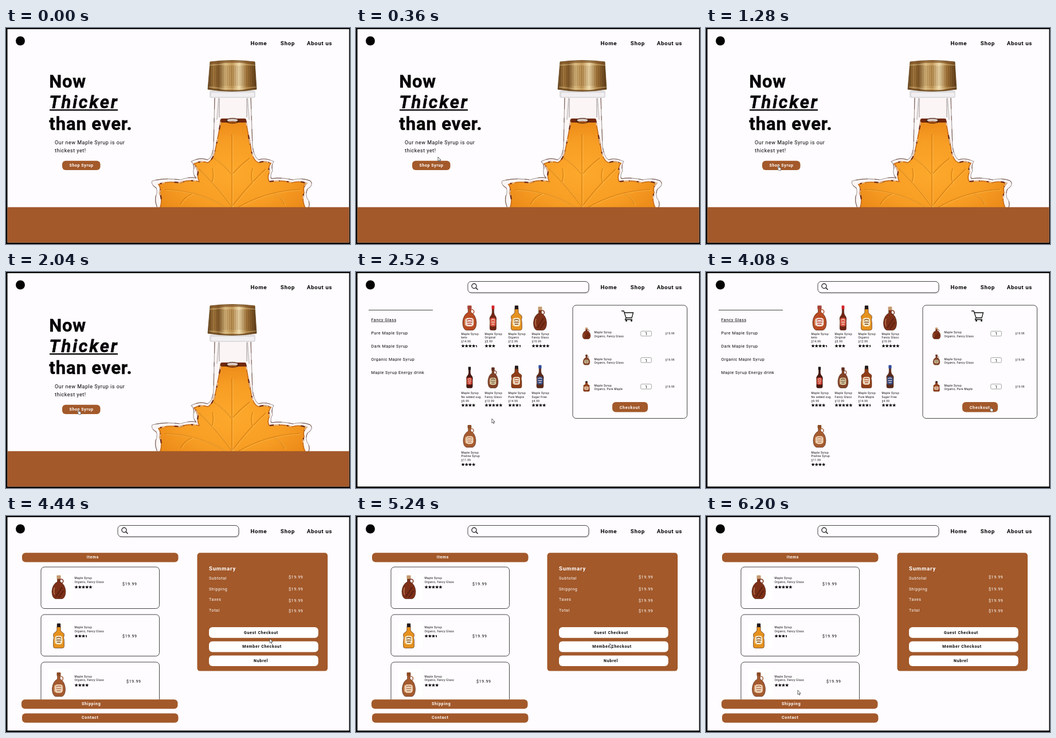
Animation, 600 px wide and 377 px high, one loop 6.24 s. Source, as an HTML page:

```html
<!DOCTYPE html>
<html lang="en">
<head>
<meta charset="utf-8">
<title>Maple syrup shop</title>
<style>
html, body { margin: 0; width: 100%; height: 100%; overflow: hidden; background: #000; }
svg { display: block; width: 600px; height: 377px; font-family: Roboto, Arial, sans-serif; }
text { white-space: pre; }
</style>
</head>
<body>
<svg id="stage" viewBox="0 0 600 377"></svg>
<script>
const BROWN = '#a3592a', INK = '#050405', PAPER = '#fefcfe';
const LOOP = 6240, TO_SHOP = 2200, TO_CHECKOUT = 4160;

const text = (x, y, str, size, { bold, spacing = 0, fill = INK, anchor = 'start', extra = '' } = {}) =>
  `<text x="${x}" y="${y}" font-size="${size}" font-weight="${bold ? 700 : 400}" letter-spacing="${spacing}" fill="${fill}" text-anchor="${anchor}" ${extra}>${str}</text>`;
const box = (x, y, w, h, r, fill, extra = '') =>
  `<rect x="${x}" y="${y}" width="${w}" height="${h}" rx="${r}" fill="${fill}" ${extra}/>`;
const path = (d, fill = 'none', stroke = 'none', width = 1, extra = '') =>
  `<path d="${d}" fill="${fill}" stroke="${stroke}" stroke-width="${width}" ${extra}/>`;
const oval = (cx, cy, rx, ry, fill) => `<ellipse cx="${cx}" cy="${cy}" rx="${rx}" ry="${ry}" fill="${fill}"/>`;
const group = (content, attrs = '') => `<g ${attrs}>${content}</g>`;
const frame = (x, y, w, h, r) => box(x, y, w, h, r, PAPER, 'stroke="#333" stroke-width=".9"');
const small = (x, y, str) => text(x, y, str, 4.8, { spacing: .36 });
const label = (x, y, str, fill = '#fff') => text(x, y, str, 7, { bold: true, spacing: .7, fill });

function starPath(cx, cy, r) {
  const points = Array.from({ length: 10 }, (_, i) => {
    const a = i * Math.PI / 5 - Math.PI / 2, d = i % 2 ? r * .42 : r;
    return `${(cx + d * Math.cos(a)).toFixed(2)} ${(cy + d * Math.sin(a)).toFixed(2)}`;
  });
  return `M${points.join('L')}Z`;
}

function stars(x, y, rating) {
  let out = '';
  for (let i = 0; i < Math.ceil(rating); i++) {
    const half = rating - i < 1;
    out += path(starPath(x + 3.1 + i * 6.2, y, 3.3), half ? 'url(#half)' : INK);
  }
  return out;
}

const SHAPES = {
  slim: 'M8 5H12V11Q12 15 16 18Q18 20 17 25V37Q17 40 14 40H6Q3 40 3 37V25Q2 20 4 18Q8 15 8 11Z',
  wide: 'M7 5H13V11Q14 14 18 16Q20 18 18 23Q19 26 19 29V37Q19 40 16 40H4Q1 40 1 37V29Q1 26 2 23Q0 18 2 16Q6 14 7 11Z',
  round: 'M8 5H12V11Q19 15 20 27Q20 38 15 40H5Q0 38 0 27Q1 15 8 11Z'
};
const KINDS = {
  keto: ['round', '#b84b22', '#a6423a', '#efe0d2', '#c23a34'],
  red: ['slim', '#6f2413', '#d3232b', '#d8503f', '#f2dcc5'],
  gold: ['wide', '#e5921f', '#22191a', '#f6e7c5', '#7a4b24'],
  jug: ['round', '#7c3018', '#c59a70', '', ''],
  dark: ['slim', '#451712', '#1f1616', '#c83b2d', '#f3ddcc'],
  cabin: ['round', '#814126', '#5d2b1d', '#dac9a0', '#70563e'],
  amber: ['wide', '#8e3d17', '#241c1c', '#eddfc4', '#b04b2d'],
  blue: ['slim', '#5a2818', '#2d4c9b', '#31477e', '#dccbd0'],
  praline: ['round', '#a55b2f', '#8b4c26', '#f0d5b7', '#b77b59']
};

function bottle(x, y, w, h, kind) {
  const [shape, body, cap, paper, print] = KINDS[kind];
  let art = path(SHAPES[shape], body, '#4b2115', .6) + box(7, 0, 6, 6, 1, cap);
  if (shape === 'round') art += `<ellipse cx="13.5" cy="10" rx="3" ry="3.4" fill="none" stroke="${body}" stroke-width="1.3"/>`;
  art += path('M4 33Q2 27 4 21', 'none', '#ffd2a0', 1, 'opacity=".55"');
  if (paper) {
    art += box(4, 20, 12, 14, 4, paper) + path('M6 24Q10 21 14 24M6 27H14M7 30.5H13', 'none', print, 1.4);
  } else {
    art += path('M6 36L15 20M10 38L17 26', 'none', '#4c180d', 2, 'opacity=".6"');
  }
  return group(art, `transform="translate(${x} ${y}) scale(${w / 20} ${h / 40})"`);
}

function heroLeaf() {
  const glass = 'M364 121L362 207Q360 227 351 230Q338 225 323 233Q330 240 327 248Q326 257 332 262Q321 259 304 265Q276 261 255 267Q252 273 262 279Q265 287 261 294Q259 304 265 316H527Q532 305 525 297Q522 288 526 281Q537 274 531 267Q518 261 500 265Q480 260 463 263Q460 257 465 249Q462 240 467 233Q452 226 441 230Q433 226 430 207L427 121Z';
  const syrup = 'M375 160H418Q422 185 427 208Q430 232 441 235Q451 231 462 236Q456 244 460 251Q455 260 459 268Q481 265 499 270Q512 266 524 271Q517 279 520 287Q515 300 523 316H268Q274 300 268 288Q271 279 266 273Q279 267 303 270Q319 264 337 268Q333 260 335 251Q333 243 328 237Q340 231 352 235Q362 230 366 208Q371 185 375 160Z';
  const veins = 'M394 185V313M394 312Q368 276 337 246M394 312Q421 276 453 246M394 256Q381 239 363 227M394 256Q409 239 425 227M359 270Q363 258 360 245M430 270Q426 258 430 245M384 313Q335 284 277 282M405 313Q455 284 513 282M326 289Q311 294 304 308M467 289Q480 294 486 308';
  const rim = (color, width, dash, offset) => path(syrup, 'none', color, width, `stroke-dasharray="${dash}" stroke-dashoffset="${offset}"`);
  const art = path(glass, '#fbf6f5', '#a5999a', 1.1) + path(syrup, 'url(#syrup)', '#c66a18', 1.6) +
    rim('#6d2c1c', 2.2, '17 13 6 19', 40) + rim('#ffd39b', 1.6, '5 24 9 17', 7) +
    path(veins, 'none', '#d17c10', 1.8, 'opacity=".65"') +
    path(veins, 'none', '#ffc65f', 1, 'transform="translate(1.8 1)" opacity=".6"') +
    path(glass, 'none', '#6b4940', 1, 'stroke-dasharray="21 15 8 12" opacity=".8"');
  return group(art, 'clip-path="url(#aboveBar)"');
}

function heroBottle() {
  let out = heroLeaf();
  out += path('M371 122L368 160M421 122L424 160', 'none', '#cfcacb', 2) + path('M372 123V156M420 123V156', 'none', '#80797a', .8);
  out += box(374, 158, 45, 7, 3, '#70280d') + oval(395, 162, 12, 5, '#512413') + oval(395, 161, 9.5, 2.8, '#d9cdc6') + oval(395, 164.5, 8, 1.8, '#9b4d14');
  out += box(355, 109, 80, 13, 3, '#dedcde') + box(358, 113, 75, 7, 2, '#f1eff1');
  out += path('M356 59Q395 54 434 59L437 107Q395 114 352 107Z', 'url(#metal)', '#65451d', .8);
  let ridges = '';
  for (let x = 357; x < 435; x += 3.3) ridges += `M${x.toFixed(1)} 66V101`;
  out += path(ridges, 'none', '#57340f', 1, 'opacity=".38"');
  out += path('M357 61Q395 56 433 61', 'none', '#805427', 4, 'opacity=".7"');
  return out + path('M355 65Q395 61 435 65M354 103Q395 109 436 103', 'none', '#ecd197', 1.2, 'opacity=".65"') +
    path('M353 106Q395 113 436 106', 'none', '#6b451c', 2, 'opacity=".8"');
}

function nav() {
  const item = (x, str) => text(x, 29.5, str, 9.8, { bold: true, spacing: .6 });
  return `<circle cx="25" cy="22.5" r="8" fill="${INK}"/>` + item(426.5, 'Home') + item(478.8, 'Shop') + item(524.8, 'About us');
}

const search = () =>
  box(196, 18, 211, 20, 6, '#d9d7d9') + frame(195, 16.5, 211, 19.5, 6) +
  '<circle cx="206" cy="24.5" r="4.1" fill="none" stroke="#111" stroke-width="1.2"/>' + path('M209 27.5L212.5 31', 'none', '#111', 1.4);

function landing() {
  const head = (y, str, spacing, extra = '') =>
    text(75.3, y, str, 31, { bold: true, spacing, extra: `stroke="${INK}" stroke-width=".45" ${extra}` });
  const copy = (y, str) => text(85, y, str, 9, { spacing: .5 });
  return heroBottle() + box(2.5, 312.7, 596, 61.8, 0, BROWN) +
    head(103.5, 'Now', .8) + head(140, 'Thicker', 2.7, 'font-style="italic"') + box(76, 142, 119, 2.3, 0, INK) + head(177.7, 'than ever.', .9) +
    copy(203.3, 'Our new Maple Syrup is our') + copy(217, 'thickest yet!') +
    box(98, 231.7, 66.5, 16.3, 6, BROWN) + text(110.5, 242.1, 'Shop Syrup', 7, { bold: true, spacing: .6, fill: '#fff' });
}

function shop() {
  const categories = ['Fancy Glass', 'Pure Maple Syrup', 'Dark Maple Syrup', 'Organic Maple Syrup', 'Maple Syrup Energy drink'];
  let out = search() + path('M22 66.5H134', 'none', '#333', .9) + path('M26.5 87H70', 'none', '#222', .7);
  categories.forEach((name, i) => out += text(26.5, 85.5 + 23 * i, name, 7.2, { spacing: .5 }));

  const products = [
    ['keto', '$14.99', 4.5, 'keto', 24, 43], ['Original', '$5.99', 3, 'red', 16, 43],
    ['Organic', '$12.99', 3.5, 'gold', 21, 43], ['Fancy Glass', '$19.99', 5, 'jug', 23, 41],
    ['No added sug.', '$9.99', 4, 'dark', 15, 37], ['Fancy Glass', '$13.99', 5, 'cabin', 18, 36],
    ['Pure Maple', '$14.99', 3.5, 'amber', 20, 39], ['Sugar Free', '$4.99', 4, 'blue', 17, 40],
    ['Praline Syrup', '$11.99', 4, 'praline', 22, 39]
  ];
  products.forEach(([name, price, rating, kind, w, h], i) => {
    const x = 183.5 + 41 * (i % 4), y = 103.5 * Math.floor(i / 4);
    out += bottle(x + 14.5 - w / 2, y + (i < 4 ? 101.5 : 99) - h, w, h, kind);
    out += small(x, y + 109.5, 'Maple Syrup') + small(x, y + 116.3, name) + small(x, y + 123, price) + stars(x, y + 129, rating);
  });

  out += frame(378, 58, 199.5, 197.5, 6);
  out += path('M463 68H467L471 80H481L483.5 71H468M471 80L469.5 83H482', 'none', '#111', 1.3) + oval(471.5, 85, 1.5, 1.5, '#111') + oval(480.5, 85, 1.5, 1.5, '#111');
  [['Fancy Glass', 'jug', 14, 20], ['Fancy Glass', 'cabin', 12, 18], ['Pure Maple', 'amber', 12, 18]].forEach(([name, kind, w, h], i) => {
    const y = 46.2 * i;
    out += bottle(402 - w / 2, y + 107 - h / 2, w, h, kind);
    out += small(415.5, y + 107.3, 'Maple Syrup') + small(415.5, y + 114, 'Organic, ' + name);
    out += box(496.8, y + 103.3, 18.5, 8.5, 1.5, '#fff', 'stroke="#999" stroke-width=".9"') + text(506, y + 110.3, '1', 7.5, { anchor: 'middle' });
    out += text(539.5, y + 109.2, '$19.99', 4.6, { spacing: .36 });
  });
  return out + box(447, 227, 62, 17.5, 6, BROWN) + label(459.8, 238.5, 'Checkout');
}

function checkout() {
  const bar = (x, y, tx, str) => box(x, y, 272.5, 16.3, 6, BROWN) + label(tx, y + 9.5, str);
  const light = (x, y, str) => text(x, y, str, 7.1, { spacing: .6, fill: '#fff' });
  let cards = '';
  [[203, 5, 'jug', 24, 41], [203, 3.5, 'gold', 21, 43], [210, 4, 'praline', 23, 42]].forEach(([px, rating, kind, w, h], i) => {
    const y = 89 + 83 * i, ty = 110.3 + 85.6 * i;
    cards += frame(61, y, 206.5, 72.5, 6) + box(73, y + 12, 43, 46, 0, '#fff') + bottle(92 - w / 2, y + 35 - h / 2 + i * 2, w, h, kind);
    cards += small(119.5, ty, 'Maple Syrup') + small(119.5, ty + 6.8, 'Organic, Fancy Glass') + stars(119.5, ty + 13.8, rating);
    cards += text(px, [121.3, 211.8, 290.6][i], '$19.99', 7, { spacing: .7 });
  });
  let out = search() + group(cards, 'clip-path="url(#listClip)"');
  out += bar(28, 64.3, 140.7, 'Items') + bar(27, 320.3, 132, 'Shipping') + bar(28, 344.5, 132, 'Contact');
  out += box(333.5, 64.3, 227.5, 206.3, 5, BROWN) + text(354, 94.5, 'Summary', 9.6, { bold: true, spacing: .8, fill: '#fff' });
  [['Subtotal', 111, 109], ['Shipping', 129.6, 129.5], ['Taxes', 148.3, 150], ['Total', 167, 167.5]].forEach(([name, y, py]) =>
    out += light(354, y, name) + light(493, py, '$19.99'));
  [[415, 'Guest Checkout'], [412.3, 'Member Checkout'], [432, 'Nubrel']].forEach(([x, str], i) => {
    const y = 194 + 24.7 * i;
    out += box(354, y, 190.7, 18.7, 6, '#fff') + label(x, y + 11.6, str, INK);
  });
  return out;
}

const defs = `<defs>
  <linearGradient id="half"><stop offset=".5" stop-color="${INK}"/><stop offset=".5" stop-color="${INK}" stop-opacity="0"/></linearGradient>
  <linearGradient id="metal"><stop offset="0" stop-color="#5f3f1c"/><stop offset=".12" stop-color="#a57a40"/><stop offset=".22" stop-color="#7d5628"/><stop offset=".36" stop-color="#d6b67c"/><stop offset=".5" stop-color="#b98e50"/><stop offset=".64" stop-color="#f1deb0"/><stop offset=".8" stop-color="#a27539"/><stop offset="1" stop-color="#5a3a18"/></linearGradient>
  <radialGradient id="syrup" cx=".5" cy=".6" r=".6"><stop offset="0" stop-color="#fda92c"/><stop offset=".6" stop-color="#f79d24"/><stop offset="1" stop-color="#eb8a18"/></radialGradient>
  <clipPath id="aboveBar"><rect x="245" y="110" width="300" height="203"/></clipPath>
  <clipPath id="listClip"><rect x="55" y="85" width="220" height="235.5"/></clipPath>
</defs>`;
const arrow = path('M0 0V7.6L1.7 6L2.9 8.6L4.1 8L2.9 5.5H5.1Z', '#fff', '#333', .75);
const hand = path('M0 0Q-1 .2 -.8 1.2V4L-2 3.6L-2.2 4.4L.2 7.8H3.2L3.8 4Q3.6 3 2.6 3L.8 2.6V1Q.8 0 0 0Z', '#fff', '#333', .65);

const stage = document.getElementById('stage');
stage.innerHTML = defs + box(0, 0, 600, 377, 0, '#000') + box(2.5, 2, 596, 372.5, 0, PAPER) + nav() +
  [landing, shop, checkout].map(draw => group(draw(), 'class="page"')).join('') +
  group(group(arrow) + group(hand), 'id="cursor"');
const pages = stage.querySelectorAll('.page');
const cursor = document.getElementById('cursor');
const [arrowShape, handShape] = cursor.children;

// Cursor stops: time, x, y
const track = [
  [80, 172, 262], [360, 143, 225], [760, 129, 240], [1280, 127, 241], [2200, 127, 241],
  [2520, 237, 256], [3120, 497, 236], [4160, 497, 236], [4440, 460, 214],
  [5200, 445, 222], [5960, 160, 304], [6240, 160, 304]
];
const buttons = [[98, 232, 164, 248], [447, 227, 509, 244], [354, 194, 545, 262]];

function cursorAt(t) {
  const i = Math.max(1, track.findIndex(key => key[0] > t));
  const [t0, x0, y0] = track[i - 1], [t1, x1, y1] = track[i];
  const p = Math.max(0, (t - t0) / (t1 - t0)), e = p * p * (3 - 2 * p);
  return [x0 + (x1 - x0) * e, y0 + (y1 - y0) * e];
}

const show = (node, visible) => node.setAttribute('visibility', visible ? 'visible' : 'hidden');

function render(t) {
  const page = t < TO_SHOP ? 0 : t < TO_CHECKOUT ? 1 : 2;
  pages.forEach((node, i) => show(node, i === page));
  const [x, y] = cursorAt(t), [left, top, right, bottom] = buttons[page];
  const over = page < 2 && x > left && x < right && y > top && y < bottom;
  cursor.setAttribute('transform', `translate(${x.toFixed(2)} ${y.toFixed(2)})`);
  show(arrowShape, t >= 80 && !over);
  show(handShape, t >= 80 && over);
}

let start;
function tick(now) {
  start ??= now;
  render((now - start) % LOOP);
  requestAnimationFrame(tick);
}
render(0);
requestAnimationFrame(tick);
</script>
</body>
</html>
```
